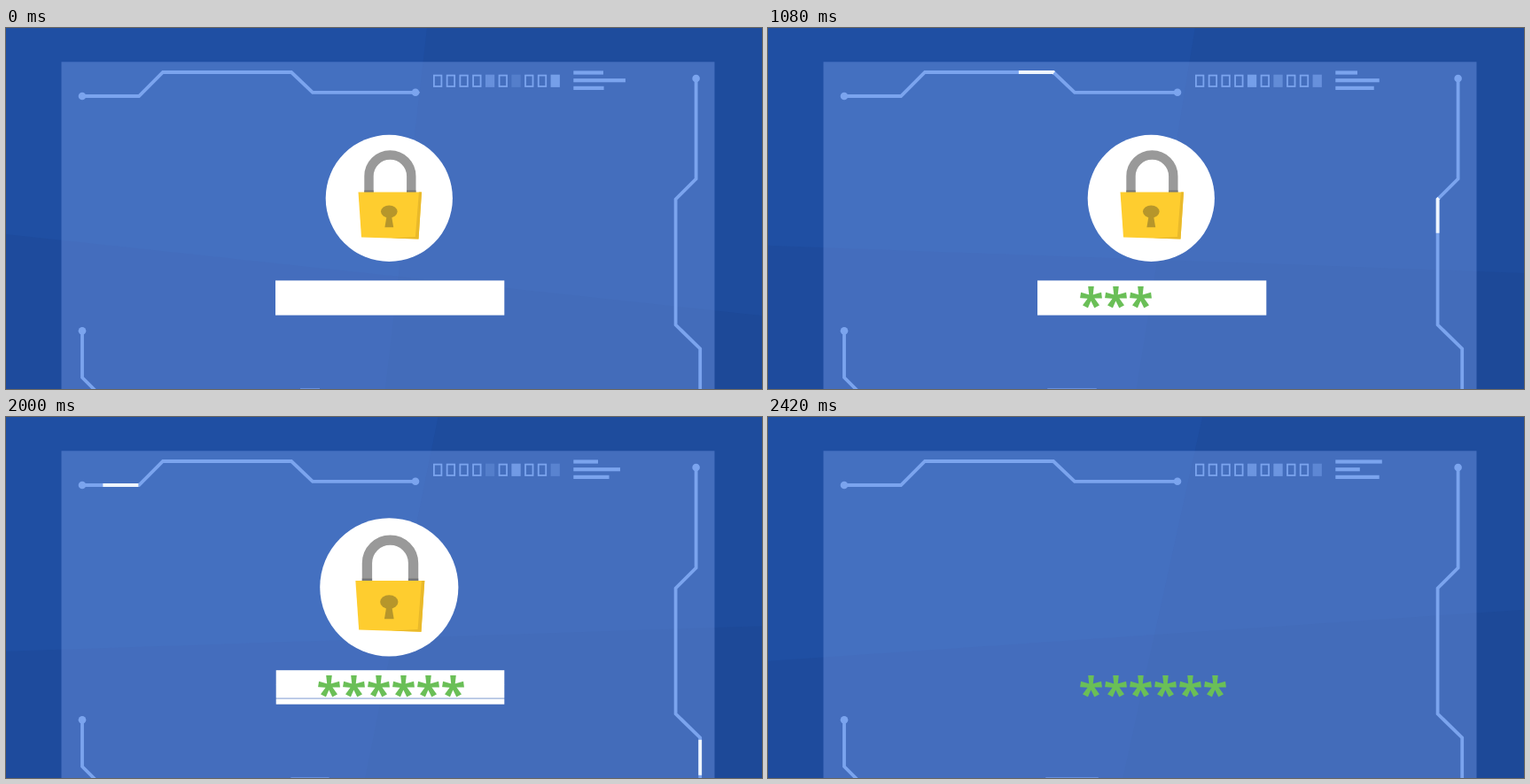
Recreate the animation shown at these times as an HTML page. Size 853 by 408 pixels, loop 2510 ms.

```html
<!DOCTYPE html>
<html lang="en">
<head>
<meta charset="utf-8">
<title>Padlock and passcode</title>
<style>
  html, body { margin: 0; width: 100%; height: 100%; overflow: hidden; background: #1f4fa3; }
  svg { display: block; width: 100vw; height: 100vh; }
  text { font: 700 51.4px "Open Sans", sans-serif; fill: #6abf57; text-anchor: middle; }
</style>
</head>
<body>
<svg id="stage" viewBox="0 0 853 408">
  <defs>
    <mask id="wireMask" maskUnits="userSpaceOnUse" x="0" y="0" width="853" height="408">
      <g id="maskWires" stroke="#fff" fill="#fff"></g>
    </mask>
  </defs>

  <rect width="853" height="408" fill="#1f4fa3"/>
  <path id="sideShade" fill="#14346f" opacity=".1"/>
  <path id="lowShade" fill="#14346f" opacity=".11"/>
  <rect x="62.5" y="38.3" width="737" height="370" fill="#7a9ee8" fill-opacity=".41"/>

  <g id="wires" stroke="#7ba4ee" fill="#7ba4ee"></g>
  <g id="glows" mask="url(#wireMask)" fill="none" stroke="#eef5fd" stroke-width="10"></g>

  <g id="cells"></g>
  <g id="bars" fill="#7ba4ee"></g>
  <rect id="peek" y="407" height="1" fill="#7ba4ee" opacity=".65"/>

  <g id="lock">
    <circle r="71.6" fill="#fff"/>
    <path d="M-22.8-6V-25A23.9 23.9 0 0 1 25-25V-6" fill="none" stroke="#999" stroke-width="10.4"/>
    <path d="M-28-9h10.4v3h-10.4zM19.8-9h10.4v3h-10.4z" fill="#777"/>
    <path d="M-34.8-6.9H36.7L33.2 46.1L-31.3 44.1Z" fill="#fecd2f"/>
    <path d="M36.7-6.9L33.2 46.1L2 45.1L29.6 43.6L33.6-6.9Z" fill="#e9b92a"/>
    <ellipse cy="15.2" rx="9.3" ry="7.1" fill="#b6962b"/>
    <path d="M-2.6 19H2.6L4.9 32.8H-4.9Z" fill="#b6962b"/>
  </g>

  <rect id="field" x="304" y="285.4" width="258.3" height="39.2" fill="#fff"/>
  <g id="strips" fill="#fff"></g>
  <g id="stars"></g>
</svg>

<script>
const $ = id => document.getElementById(id);
const LOOP = 2510, FRAMES = 30;

function add(parent, tag, attrs) {
  const el = document.createElementNS('http://www.w3.org/2000/svg', tag);
  set(el, attrs);
  parent.appendChild(el);
  return el;
}

function set(el, attrs) {
  for (const k in attrs) el.setAttribute(k, attrs[k]);
}

// 1 at the peak, 0 half a period later
function triangle(f, peak, period) {
  const u = (((f - peak) / period) % 1 + 1) % 1;
  return Math.abs(1 - 2 * u);
}

// Circuit wires with round terminals
const wires = [
  'M462 72.8H346L322 50H177L150 77H86',
  'M778.6 57V170.5L755.6 193.5V335.5L783.2 362.5V412',
  'M86 342.3V395L102 411'
];
const dots = [[86, 77], [462, 72.8], [778.6, 57], [86, 342.3]];
for (const id of ['wires', 'maskWires']) {
  wires.forEach(d => add($(id), 'path', { d, fill: 'none', 'stroke-width': 3.8 }));
  dots.forEach(([cx, cy]) => add($(id), 'circle', { cx, cy, r: 4.3, stroke: 'none' }));
}

// Light pulses run along the wires, starting LEAD px before each terminal
const LEAD = 8, PULSE = 40;
const glows = [
  'M470 72.8H346L322 50H177L150 77H78',
  'M778.6 49V170.5L755.6 193.5V335.5L783.2 362.5V420',
  'M86 334.3V395L112 421'
].map(d => add($('glows'), 'path', { d, 'stroke-dasharray': PULSE + ' 3000' }));

// Status cells: three blink, the others are outlines
const blinkPeaks = { 4: 14, 6: 8, 9: -1 };
const cells = Array.from({ length: 10 }, (_, i) => {
  const x = 482 + i * 14.73;
  return i in blinkPeaks
    ? add($('cells'), 'rect', { x, y: 52.7, width: 10.3, height: 14.2, fill: '#7ba4ee' })
    : add($('cells'), 'rect', { x: x + .9, y: 53.6, width: 8.5, height: 12.4,
        fill: 'none', stroke: '#7ba4ee', 'stroke-width': 1.8 });
});

const barPeaks = [7.22, -.27, 4.2];
const bars = barPeaks.map((_, i) =>
  add($('bars'), 'rect', { x: 640.3, y: 48.4 + i * 8.7, height: 4.2 }));

// Slices of the input field: top, height, vertical anchor, side that retreats
const slices = [
  { y: 286.2, h: 16, anchor: .5, left: true },
  { y: 302, h: 15.7, anchor: 0, left: false },
  { y: 318.4, h: 6.3, anchor: 1, left: true }
];
const strips = slices.map(() => add($('strips'), 'rect', {}));

const stars = Array.from({ length: 6 }, (_, i) => {
  const el = add($('stars'), 'text', { x: 364.5 + i * 28, y: 332.4 });
  el.textContent = '*';
  return el;
});

function drawBackground(f) {
  const left = 233 + .6 * f + .03 * f * f;
  const right = 325 - 3.7 * f;
  set($('lowShade'), { d: `M0 ${left}L853 ${right}V408H0Z` });
  set($('sideShade'), { d: `M${475 + .52 * f} 0H853V408H${428 - .95 * f}Z` });
}

function drawPulses(f) {
  const run = -48 + 14.7 * f + 36 * (f / 26) ** 5;
  const tails = [run + 4, run, -42 + 18.2 * (f - 16)];
  glows.forEach((el, i) => set(el, { 'stroke-dashoffset': -(tails[i] + LEAD) }));
}

function drawStatus(f) {
  for (const i in blinkPeaks)
    set(cells[i], { opacity: .2 + .8 * triangle(f, blinkPeaks[i], 18) });
  bars.forEach((el, i) =>
    set(el, { width: 24.6 + 35.7 * triangle(f, barPeaks[i], 11.52) }));
  const half = 11 + 19 * Math.abs(Math.sin(Math.PI * f / 20)) ** 1.1;
  set($('peek'), { x: 343 - half, width: 2 * half });
}

function drawLock(f) {
  // back-in easing: swells a little, then collapses
  const t = Math.min(1, Math.max(0, (f - 20) / 8.15));
  const scale = Math.max(0, 1 - (2.70158 * t ** 3 - 1.70158 * t ** 2));
  set($('lock'), { transform: `translate(432.3 192.4) scale(${scale})` });
}

function drawField(f) {
  const sliced = f >= 24;
  set($('field'), { visibility: sliced ? 'hidden' : 'visible' });
  set($('strips'), { visibility: sliced ? 'visible' : 'hidden' });
  if (!sliced) return;
  const q = ((f - 24) / 5) ** 2.5;
  set($('strips'), { opacity: 1 - q });
  strips.forEach((el, i) => {
    const { y, h, anchor, left } = slices[i];
    const height = h * (1 - q) ** 1.8;
    const width = 257.6 * (1 - q);
    set(el, { x: left ? 562.3 - width : 304.7, y: y + (h - height) * anchor, width, height });
  });
}

function drawStars(f) {
  const typed = Math.floor((f + 2) / 4);
  stars.forEach((el, i) => set(el, { visibility: i < typed ? 'visible' : 'hidden' }));
}

function frameAt(t) {
  let f = FRAMES - 1;
  while (Math.round(f * 25 / 3) * 10 > t) f--;
  return f;
}

function draw(f) {
  drawBackground(f);
  drawPulses(f);
  drawStatus(f);
  drawLock(f);
  drawField(f);
  drawStars(f);
}

const start = performance.now();
function tick() {
  draw(frameAt((performance.now() - start) % LOOP));
  requestAnimationFrame(tick);
}
draw(0);
requestAnimationFrame(tick);
</script>
</body>
</html>
```
